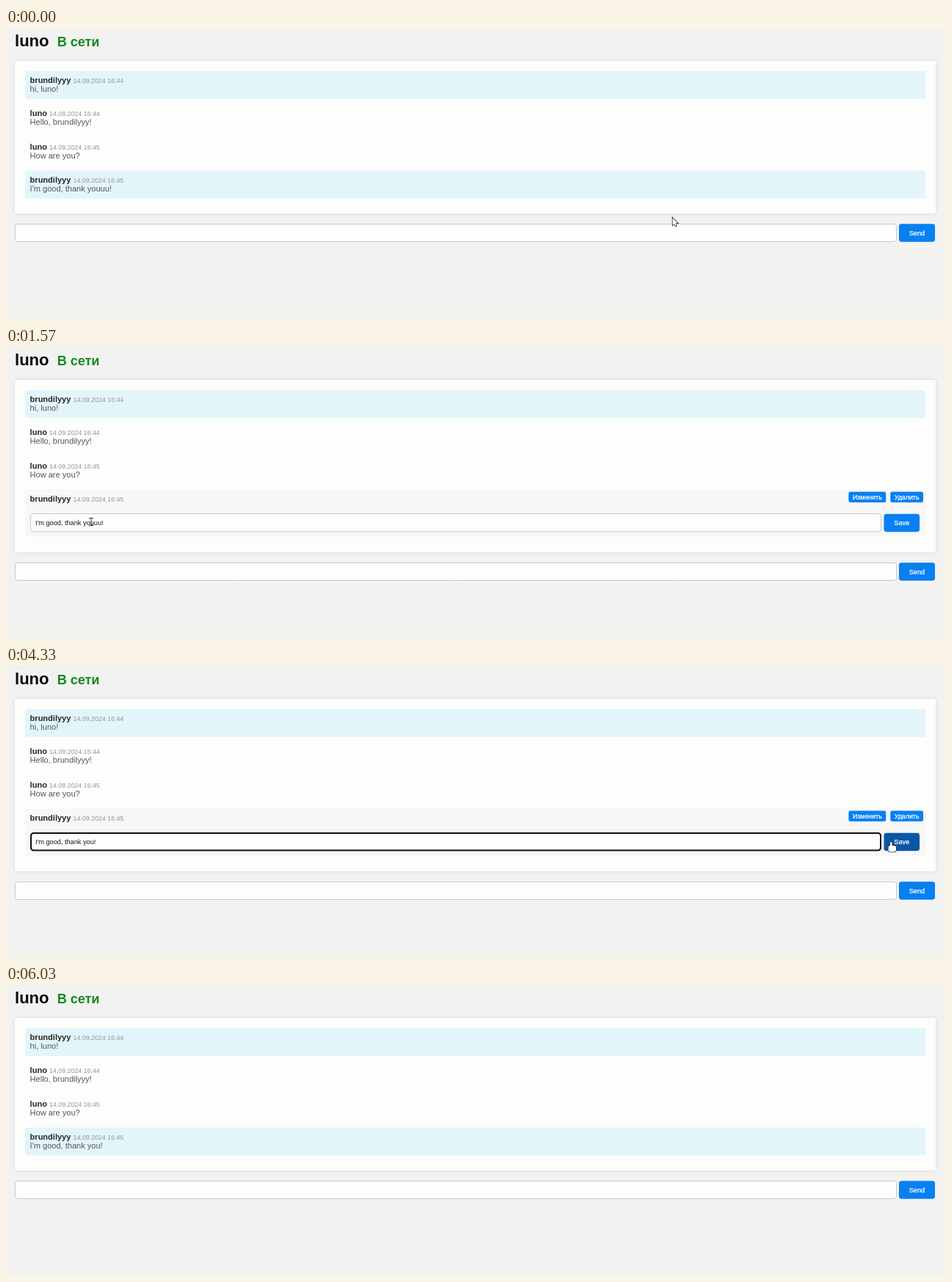
Recreate the animation shown at these times as an HTML page with a canvas. Size 1280 by 397 pixels, loop 6560 ms.

```html
<!DOCTYPE html>
<html lang="en">
<head>
<meta charset="utf-8">
<title>Chat</title>
<style>
  html, body { margin: 0; width: 100%; height: 100%; overflow: hidden; background: #f2f2f0; }
  canvas { display: block; }
</style>
</head>
<body>
<canvas id="stage" width="1280" height="397"></canvas>
<script>
const ctx = document.getElementById('stage').getContext('2d');
const FAMILY = '"Liberation Sans", Arial, sans-serif';
const LOOP = 6560;
const OPEN = 700, FOCUS = 2000, ERASE = [2970, 3400], BLUR = 4430, SAVED = 4970;
const C = { page: '#f2f2f0', panel: '#fdfdfc', own: '#e2f5fb', hover: '#f7f7f7',
            blue: '#0780f2', dark: '#0a56a6', line: '#c8c8c8' };

// The page is shown at 69% zoom
const css = n => n * 0.69;
const BODY = css(16), SMALL = css(12.8), INPUT = css(13.33), RADIUS = css(5);
const PANEL = { x: 12, y: 45, w: 1254, h: 208 };
const ROW = { x: 26, w: 1226.5, h: 38.2, step: 45.2 };
const GROW = 27;
const PAD = css(10), TEXT_X = ROW.x + PAD - 0.3;

const ME = 'brundilyyy', PEER = 'luno';
const messages = [
  { who: ME, time: '16:44', text: `hi, ${PEER}!` },
  { who: PEER, time: '16:44', text: `Hello, ${ME}!` },
  { who: PEER, time: '16:45', text: 'How are you?' },
  { who: ME, time: '16:45', draft: true }
];

const smooth = k => k * k * (3 - 2 * k);
const speedUp = k => k ** 1.8;
const slowDown = k => 1 - (1 - k) ** 3.1;

// Pointer strokes; the pointer rests between them, bow bends the line
const home = { x: 907, y: 258 };
const strokes = [
  { from: 30, to: 400, x: 1186, y: 201, ease: smooth },
  { from: 760, to: 1330, x: 116, y: 239, ease: smooth },
  { from: 1600, to: 1800, x: 131, y: 240, ease: smooth },
  { from: 2270, to: 2600, x: 153, y: 309, ease: speedUp },
  { from: 3740, to: 4370, x: 1205, y: 240, ease: slowDown, bow: -16 },
  { from: 5140, to: 6030, x: 890, y: 30, ease: smooth, bow: 110 }
];

function pointerAt(t) {
  const typing = t >= ERASE[0] && t < 3570;
  if (typing || t >= strokes.at(-1).to) return null;
  let { x, y } = home;
  for (const s of strokes) {
    if (t < s.from) break;
    const e = s.ease(Math.min(1, (t - s.from) / (s.to - s.from)));
    x += (s.x - x) * e;
    y += (s.y - y) * e + (s.bow || 0) * Math.sin(Math.PI * e);
  }
  return { x: Math.round(x), y: Math.round(y), kind: 'arrow' };
}

const inside = (p, x, y, w, h) => !!p && p.x >= x && p.x < x + w && p.y >= y && p.y < y + h;

function box(x, y, w, h, r, fill) {
  ctx.beginPath();
  ctx.roundRect(x, y, w, h, r);
  ctx.fillStyle = fill;
  ctx.fill();
}

function text(s, x, y, size, color, weight = 'normal') {
  ctx.font = `${weight} ${size}px ${FAMILY}`;
  ctx.fillStyle = color;
  ctx.fillText(s, x, y);
  return ctx.measureText(s).width;
}

// Sized by its label and placed by its right edge; returns its left edge
function button(p, label, right, y, h, size, pad, r) {
  ctx.font = `${size}px ${FAMILY}`;
  const w = ctx.measureText(label).width + 2 * pad, x = right - w;
  const over = inside(p, x, y, w, h);
  if (over) p.kind = 'hand';
  box(x, y, w, h, r, over ? C.dark : C.blue);
  const base = Math.round(y + h / 2 + size * 0.36);
  text(label, x + pad, base, size, '#fff');
  ctx.strokeStyle = '#fff';
  ctx.lineWidth = 0.25;
  ctx.strokeText(label, x + pad, base);
  return x;
}

const submit = (p, label, right, y) => button(p, label, right, y, 24.5, INPUT, css(20), RADIUS);
const action = (p, label, right, y) => button(p, label, right, y, 14.3, SMALL, css(8), css(3));

function field(p, x, y, w, h, focused) {
  if (inside(p, x, y, w, h)) p.kind = 'beam';
  const line = focused ? 2 : 1;
  box(x + line / 2, y + line / 2, w - line, h - line, RADIUS, C.panel);
  ctx.lineWidth = line;
  ctx.strokeStyle = focused ? '#101010' : C.line;
  ctx.stroke();
}

const draftAt = t => "I'm good, thank you" + 'u'.repeat(2 - ERASE.filter(e => t >= e).length);

function caretOn(t) {
  const since = [FOCUS, ...ERASE].filter(e => t >= e).pop();
  return t >= FOCUS && t < BLUR && (t - since) % 1060 < 530;
}

function editor(t, p) {
  const x = TEXT_X + PAD + 0.4, base = 243;
  field(p, 33, 227, 1159, 25.5, t >= FOCUS && t < BLUR);
  const w = text(draftAt(t), x, base, INPUT, '#161616');
  text('!', x + w, base, INPUT, '#161616');
  if (caretOn(t)) {
    ctx.fillStyle = '#000';
    ctx.fillRect(Math.round(x + w), base - 8, 1, 10);
  }
  submit(p, 'Save', 1244, 227.7);
}

function row(m, i, t, p, editing) {
  const y = PANEL.y + css(20) + i * ROW.step, base = Math.floor(y + PAD + BODY * 0.91);
  const open = editing && m.draft, h = ROW.h + (open ? GROW - 0.5 : 0);
  const over = inside(p, ROW.x, y, ROW.w, h), own = m.who === ME;
  if (over || own) box(ROW.x, y, ROW.w, h, RADIUS, over ? C.hover : C.own);
  const w = text(m.who, TEXT_X, base, BODY, '#262626', 'bold');
  text('14.09.2024 ' + m.time, TEXT_X + w + 3.1, base, SMALL, '#959595');
  if (open) editor(t, p);
  else text(m.text || draftAt(t) + '!', TEXT_X, base + 12, BODY, '#555');
  if (over && own) {
    const left = action(p, 'Удалить', 1249, y + 3.2);
    action(p, 'Изменить', left - 6, y + 3.2);
  }
}

function outlined(shape) {
  ctx.strokeStyle = '#2a2a2a';
  ctx.lineWidth = 1.6;
  ctx.stroke(shape);
  ctx.fillStyle = '#fff';
  ctx.fill(shape);
}

function pointer({ x, y, kind }) {
  const shape = new Path2D();
  ctx.save();
  ctx.translate(x, y);
  if (kind === 'beam') {
    ctx.fillStyle = '#333';
    for (const top of [-6, 4]) ctx.fillRect(-3, top, 6, 1);
    ctx.fillRect(-0.5, -6, 1, 11);
  } else if (kind === 'hand') {
    shape.roundRect(-1, 0, 2.4, 10, 1.2);
    shape.roundRect(-3.5, 5, 10.5, 8.5, 3);
    outlined(shape);
  } else {
    shape.addPath(new Path2D('M.7 1V11L3 8.9L4.7 12.4L6.2 11.8L4.7 8.3H7.7Z'));
    outlined(shape);
  }
  ctx.restore();
}

function draw(t) {
  const p = pointerAt(t), editing = t >= OPEN && t < SAVED, drop = editing ? GROW : 0;
  ctx.fillStyle = C.page;
  ctx.fillRect(0, 0, 1280, 397);
  text(PEER, PANEL.x, 25, css(32), '#0b0b0b', 'bold');
  text('В сети', 69.7, 25, 18, '#12891f', 'bold');

  ctx.shadowColor = 'rgba(0,0,0,.1)';
  ctx.shadowBlur = css(10);
  box(PANEL.x, PANEL.y, PANEL.w, PANEL.h + drop, RADIUS, C.panel);
  ctx.shadowColor = 'transparent';

  messages.forEach((m, i) => row(m, i, t, p, editing));
  const y = PANEL.y + PANEL.h + drop + 14;
  field(p, PANEL.x, y, 1201, 25);
  submit(p, 'Send', 1265, y + 0.3);
  if (p) pointer(p);
}

const start = performance.now();
function tick() {
  draw((performance.now() - start) % LOOP);
  requestAnimationFrame(tick);
}
tick();
</script>
</body>
</html>
```
